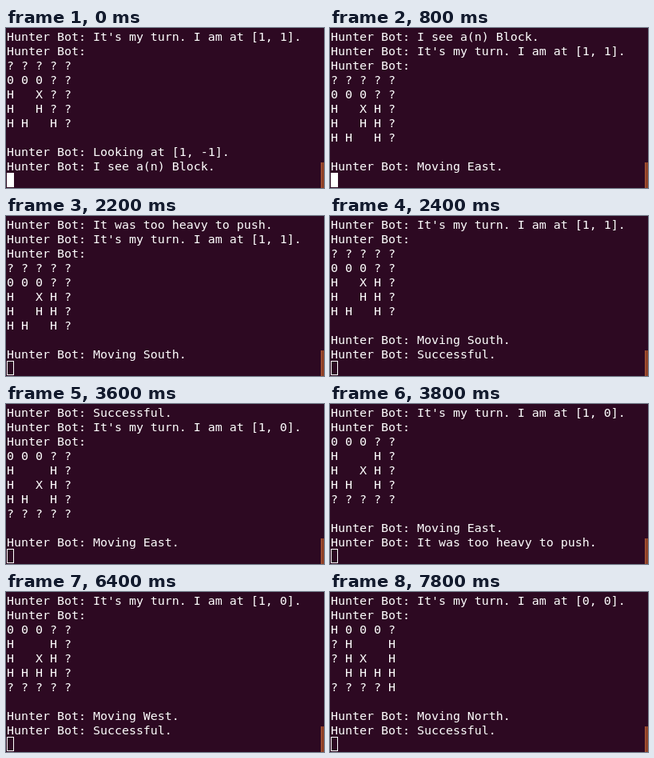
An HTML page that plays this animation: 398 by 200 pixels, repeating every 8 s.

```html
<!DOCTYPE html>
<html lang="en">
<head>
<meta charset="utf-8">
<style>
  html, body { margin: 0; width: 100%; height: 100%; overflow: hidden; background: #2d0922; }
  #screen {
    position: absolute; left: 1px; top: 2px; margin: 0;
    font: 14.95px/18px "DejaVu Sans Mono", monospace;
    font-variant-ligatures: none; color: #fff;
  }
  #cursor {
    position: absolute; left: 1px; top: 181px; width: 9px; height: 18px;
    box-sizing: border-box; border: 1px solid #fff;
  }
  #cursor.solid { background: #fff; }
  #scrollbar {
    position: absolute; left: 394px; top: 168px; width: 4px; height: 32px;
    box-sizing: border-box; background: #8f4127; border-left: 1px solid #a8583a;
  }
</style>
</head>
<body>
<pre id="screen"></pre>
<div id="cursor"></div>
<div id="scrollbar"></div>
<script>
const LOOP = 8000;
const BLOCK = "I see a(n) Block.", HEAVY = "It was too heavy to push.", DONE = "Successful.";

const walled = ["? ? ? ? ?", "0 0 0 ? ?", "H   X H ?", "H   H H ?", "H H   H ?"];
const south = ["0 0 0 ? ?", "H     H ?", "H   X H ?", "H H   H ?", "? ? ? ? ?"];
const west = ["H 0 0 0 ?", "? H     H", "? H X   H", "  H H H H", "? ? ? ? H"];
const swapRow = (grid, row, text) => grid.map((line, i) => i === row ? text : line);
const halfSeen = swapRow(walled, 2, "H   X ? ?");

// position, known map, action, result
const turns = [
  ["1, 1", swapRow(halfSeen, 3, "H   H ? ?"), "Looking at [1, -1].", BLOCK],
  ["1, 1", halfSeen, "Looking at [1, 0].", BLOCK],
  ["1, 1", walled, "Moving East.", HEAVY],
  ["1, 1", walled, "Moving South.", DONE],
  ["1, 0", south, "Moving East.", HEAVY],
  ["1, 0", south, "Moving South.", HEAVY],
  ["1, 0", swapRow(south, 3, "H H H H ?"), "Moving West.", DONE],
  ["0, 0", west, "Moving North.", DONE],
];

const say = text => "Hunter Bot: " + text;
const log = turns.flatMap(([at, grid, action, result]) =>
  [say(`It's my turn. I am at [${at}].`), say(""), ...grid, "", say(action), say(result)]);

// time in ms, number of log lines printed so far
const prints = [[0, 10], [400, 20], [800, 29], [1000, 30], [2200, 39], [2400, 40],
  [3600, 49], [3800, 50], [5000, 60], [6400, 70], [7800, 80]];

const screenEl = document.getElementById("screen");
const cursorEl = document.getElementById("cursor");
let shown = 0;

function draw(now) {
  const t = now % LOOP;
  const count = prints.findLast(([start]) => start <= t)[1];
  if (count !== shown) {
    screenEl.textContent = log.slice(count - 10, count).join("\n");
    shown = count;
  }
  cursorEl.classList.toggle("solid", t < 200 || (t >= 800 && t < 1200));
}

function tick() {
  draw(performance.now());
  requestAnimationFrame(tick);
}
tick();
</script>
</body>
</html>
```
